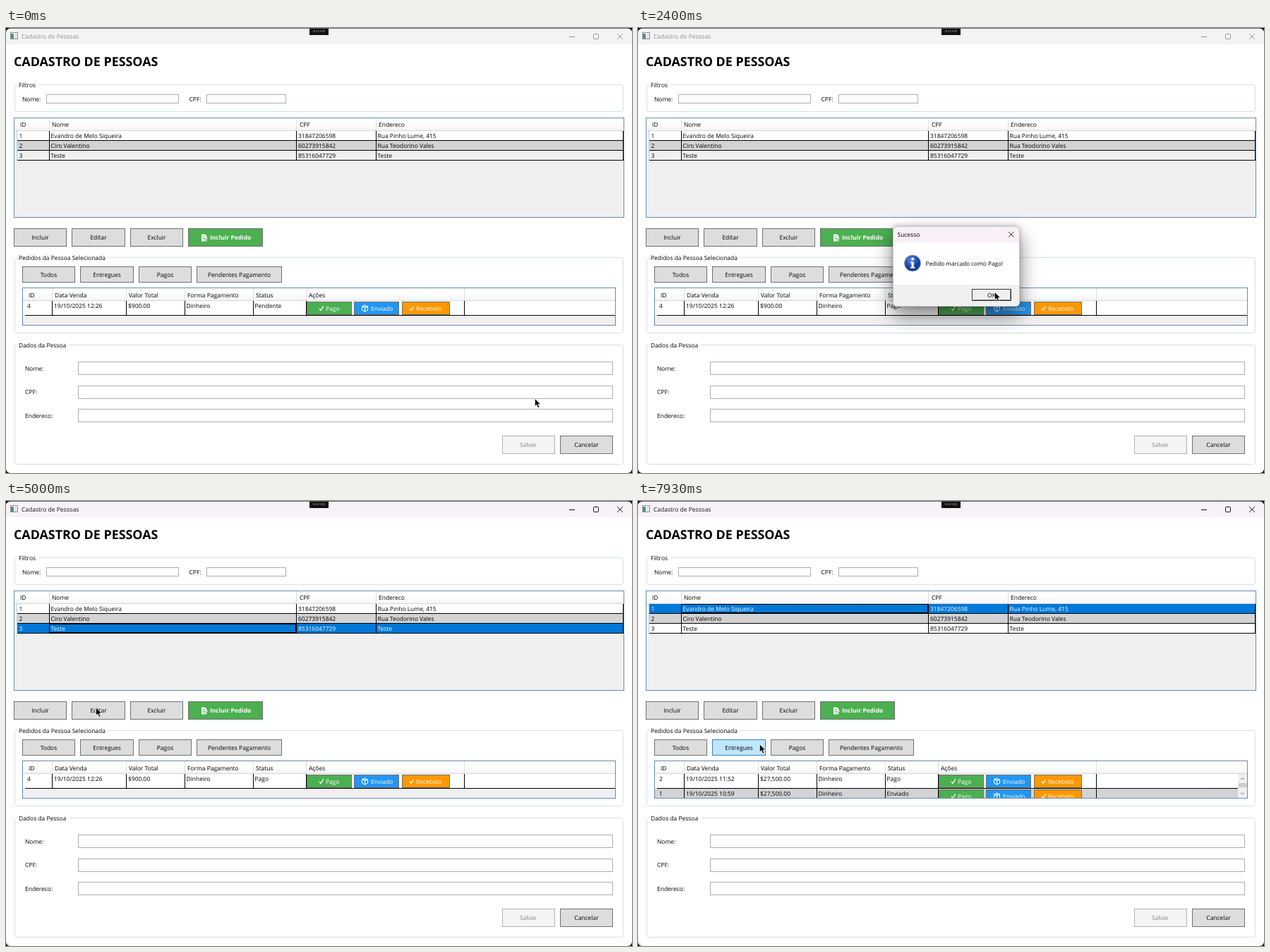
An HTML page for the animation above (8000 ms loop, 887 px wide and 631 px high).

```html
<!DOCTYPE html>
<html lang="pt-BR">
<head>
<meta charset="utf-8">
<title>Cadastro de Pessoas</title>
<style>
html, body { margin: 0; width: 100%; height: 100%; overflow: hidden; background: #000; }
svg { display: block; width: 887px; height: 631px; }
text { font-family: "Open Sans", "Noto Sans", sans-serif; font-size: 8.46px; text-rendering: geometricPrecision; white-space: pre; }
.dialog { filter: drop-shadow(0 13px 14px rgba(0,0,0,.42)) drop-shadow(0 0 3px rgba(0,0,0,.25)); }
</style>
</head>
<body>
<svg id="stage" viewBox="0 0 887 631"></svg>
<script>
const LOOP = 8000, STEP = 1000 / 15;
const BLUE = '#0078d7', GREEN = '#4caf50', GRAY = '#d3d3d3';

const box = (x, y, w, h, fill, extra = '') =>
  `<rect x="${x}" y="${y}" width="${w}" height="${h}" fill="${fill}" ${extra}/>`;
const frame = (x, y, w, h, fill, stroke, extra = '') =>
  box(x + .5, y + .5, w - 1, h - 1, fill, `stroke="${stroke}" ${extra}`);
const label = (x, y, s, fill = '#000', extra = '') =>
  `<text x="${x}" y="${y}" fill="${fill}" ${extra}>${s}</text>`;
const line = (d, stroke, w = 1, extra = '') =>
  `<path d="${d}" fill="none" stroke="${stroke}" stroke-width="${w}" ${extra}/>`;
const hline = (x1, x2, y, c = '#000') => box(x1, y, x2 - x1, 1, c);
const vline = (x, y1, y2, c = '#000') => box(x, y1, 1, y2 - y1, c);
const middle = 'text-anchor="middle"';

function button(x, y, w, h, s, hot) {
  return frame(x, y, w, h, hot ? '#bee6fd' : '#ddd', hot ? '#3c7fb1' : '#707070') +
    label(x + w / 2, y + h / 2 + 3, s, '#000', middle);
}

function group(y, h, s, w) {
  return frame(12, y, 863, h, 'none', '#d5dfe5', 'rx="3"') +
    box(16, y - 4, w + 4, 9, '#fff') + label(18, y + 3.5, s);
}

const input = (x, y, w, h) => frame(x, y, w, h, '#fff', '#abadb3');

function windowBar(active) {
  const ink = active ? '#111' : '#909090';
  return box(0, 0, 887, 23, active ? '#f8f1f8' : '#f3f3f3') +
    frame(6, 6, 11, 10, '#fff', '#8d9296') + box(7, 8, 4, 7, '#4f8f88') + box(12, 8, 4, 7, '#dfe4e6') +
    label(22, 15, 'Cadastro de Pessoas', ink) +
    hline(798, 806, 12, ink) +
    frame(832, 8, 8, 8, 'none', ink, 'rx="1"') +
    line('M866 8l8 8m0-8l-8 8', ink, .9) +
    box(430, 0, 27, 10, '#111') + box(435, 3, 17, 3, '#4c4c4c') +
    [438, 441, 444, 447].map(x => box(x, 3, 1, 3, '#111')).join('');
}

// People table
const people = [
  ['1', 'Evandro de Melo Siqueira', '31847206598', 'Rua Pinho Lume, 415'],
  ['2', 'Ciro Valentino', '60273915842', 'Rua Teodorino Vales'],
  ['3', 'Teste', '85316047729', 'Teste']
];
const peopleCols = [61, 411, 524];

function peopleGrid(selected, idleRow) {
  let s = frame(11, 127, 865, 142, '#f0f0f0', '#688caf') + box(12, 128, 863, 17, 'url(#head)') +
    hline(12, 875, 145, '#d5d5d5') + box(12, 146, 4, 42, '#f1f8fc') + vline(15, 146, 188, '#b9d3e0');
  peopleCols.forEach(x => s += vline(x, 128, 145, '#dcdfe2'));
  ['ID', 'Nome', 'CPF', 'Endereco'].forEach((h, i) => s += label([20, 65, 416, 528][i], 140, h));
  people.forEach((row, i) => {
    const y = 146 + 14.1 * i | 0, on = selected === i;
    s += box(16, y, 859, 13, on ? BLUE : i === 1 ? GRAY : idleRow === i ? '#f0f0f0' : '#fff');
    row.forEach((c, k) => s += label([18.5, 63.5, 414, 526.5][k], y + 10, c, on ? '#fff' : '#000'));
    s += hline(16, 875, y + 13);
    peopleCols.forEach(x => s += vline(x, y, y + 13));
    s += vline(874, y, y + 13);
    if (on) s += frame(61, y, 350, 13, 'none', '#000');
  });
  return s;
}

// Orders table
const orderCols = [65, 170, 253, 350, 425, 649];
const tick = (x, y) => line(`M${x} ${y}l2 2.4l3.8-6`, '#fff', 1.2);
const cube = (x, y) =>
  line(`M${x} ${y - 4.5}l4 2v5l-4 2l-4-2v-5zM${x - 4} ${y - 2.5}l4 2l4-2M${x} ${y - .5}v5M${x - 2} ${y - 3.5}l4 2`, '#fff', 1);

function actions(y, pago) {
  const bt = (x, w, c, tx, s) => frame(x, y, w, 19, c, '#707070') +
    label(tx, y + 12.5, s, '#fff', 'font-weight="500"');
  return bt(426, 64, pago || GREEN, 453, 'Pago') + tick(444, y + 10) +
    bt(493, 64, '#2196f3', 517, 'Enviado') + cube(508.5, y + 9.5) +
    bt(561, 68, '#ff9800', 581, 'Recebido') + tick(572, y + 10);
}

function orderRow(y, cells, fill, right, selected, pago) {
  const ink = selected ? '#fff' : '#000';
  let s = box(24, y, right - 24, 20, fill);
  if (selected) s += box(27, y, 623, 20, BLUE);
  cells.forEach((c, k) => s += label([30, 68, 173, 255.5, 352.5][k], y + 10.4, c, ink));
  s += hline(27, right, y + 20);
  orderCols.forEach(x => s += vline(x, y, y + 20));
  s += actions(y + 1, pago);
  if (selected) s += box(426, y + .8, 223, 19, 'none', 'stroke="#000" stroke-width="1.7"');
  return s;
}

function orderGrid(o) {
  let s = frame(23, 368, 841, 54, '#f0f0f0', '#688caf') + box(24, 369, 839, 17, 'url(#head)') +
    hline(24, 863, 386, '#d5d5d5');
  orderCols.forEach(x => s += vline(x, 369, 386, '#dcdfe2'));
  ['ID', 'Data Venda', 'Valor Total', 'Forma Pagamento', 'Status', 'Ações']
    .forEach((h, i) => s += label([32, 69, 174, 257, 354, 429][i], 381.5, h));
  s += '<g clip-path="url(#rows)">';
  if (o.many) {
    s += orderRow(387, ['2', '19/10/2025 11:52', '$27,500.00', 'Dinheiro', 'Pago'], '#fff', 850) +
      orderRow(408, ['1', '19/10/2025 10:59', '$27,500.00', 'Dinheiro', 'Enviado'], GRAY, 850) +
      box(850, 387, 13, 34, '#f0f0f0') + box(851, 400, 12, 6, '#cdcdcd') +
      line('M854 395l2.5-2.5l2.5 2.5M854 413.500l2.5 2.500l2.5-2.500', '#777');
  } else {
    s += orderRow(387, ['4', '19/10/2025 12:26', '$900.00', 'Dinheiro', o.paid ? 'Pago' : 'Pendente'],
      '#fff', 863, o.selected, o.pago);
  }
  return s + '</g>';
}

function dialog() {
  return '<g class="dialog"><g clip-path="url(#dlg)">' +
    box(361, 281, 180, 114, '#fff') + box(361, 281, 180, 23, '#f9f0f8') + box(361, 364, 180, 31, '#f0f0f0') + '</g></g>' +
    frame(361, 281, 180, 114, 'none', '#aaa5aa', 'rx="6" stroke-opacity=".6"') +
    label(367.5, 296, 'Sucesso') + line('M525 289l7.500 7.500m0-7.500l-7.500 7.500', '#111', .9) +
    '<circle cx="389" cy="333.500" r="11.500" fill="url(#info)" stroke="#9aa3b4"/>' +
    '<circle cx="389.300" cy="327.500" r="1.900" fill="#fff"/>' +
    '<path d="M386 331.500h4.800v7.500h1.700v1.700h-6.700v-1.700h1.700v-5.800h-1.500z" fill="#fff"/>' +
    label(407.5, 337, 'Pedido marcado como Pago!', '#000', 'style="font-size:8.230px" font-weight="500"') +
    frame(473, 370, 56, 17, '#f0f0f0', '#333') + line('M474.500 385V371.500H527', '#fff') +
    line('M475 385.500H527.500V372', '#808080') + label(501, 381.7, 'OK', '#000', middle);
}

// Pointer path: time, x, y
const path = [
  [0, 749, 525], [60, 749, 525], [740, 449, 398], [1010, 449, 398], [1600, 547, 405], [1850, 547, 405],
  [2400, 505, 374], [2670, 497, 371], [3400, 497, 371], [3900, 260, 222], [4400, 150, 182], [4730, 137, 181],
  [4790, 136, 181], [5000, 127, 292.500], [5200, 80, 302], [5470, 62, 347], [5660, 62, 347], [5867, 79, 368.500],
  [5930, 78, 372], [6050, 78, 372], [6333, 256, 287], [6560, 256, 287], [6930, 192, 152], [7330, 177, 152],
  [7430, 177, 152], [7933, 172, 344.500], [8000, 172, 344.500]
];

function pointer(t) {
  const i = Math.max(1, path.findIndex(p => p[0] >= t));
  const [a, b] = [path[i - 1], path[i]];
  const u = (t - a[0]) / (b[0] - a[0]), e = u * u * (3 - 2 * u);
  const x = a[1] + (b[1] - a[1]) * e, y = a[2] + (b[2] - a[2]) * e;
  return `<path transform="translate(${x.toFixed(1)} ${y.toFixed(1)})" ` +
    'd="M.4 .4V11.600L3 9.300L4.900 13.700L6.900 12.800L5 8.600H8.500z" fill="#000" stroke="#fff" stroke-width=".7"/>';
}

const defs = `<defs>
<linearGradient id="head" x2="0" y2="1"><stop offset=".4" stop-color="#fff"/><stop offset="1" stop-color="#f4f5f7"/></linearGradient>
<radialGradient id="info" cx=".4" cy=".3"><stop offset="0" stop-color="#5b8be0"/><stop offset="1" stop-color="#123c9c"/></radialGradient>
<clipPath id="win"><rect y=".7" width="887" height="630.3" rx="6"/></clipPath>
<clipPath id="rows"><rect x="24" y="387" width="839" height="34"/></clipPath>
<clipPath id="dlg"><rect x="361" y="281" width="180" height="114" rx="6"/></clipPath>
</defs>`;

const form = group(80, 39, 'Filtros', 26) + label(23, 104, 'Nome:') + input(57, 94, 188, 13) +
  label(259.5, 104, 'CPF:') + input(284, 94, 113, 13) +
  label(11, 54, 'CADASTRO DE PESSOAS', '#000', 'style="font-size:17.850px" font-weight="700"') +
  group(449, 170, 'Dados da Pessoa', 69) +
  ['Nome:', 'CPF:', 'Endereco:'].map((s, i) =>
    label(27, 485.7 + i * 33.7, s) + input(102, Math.round(473 + i * 33.5), 758, 19)).join('') +
  frame(703, 578, 75, 26, '#f4f4f4', '#adb2b5') + label(740, 594, 'Salvar', '#838383', middle) +
  button(785, 578, 75, 26, 'Cancelar');

const addOrder = frame(258, 284, 106, 26, GREEN, '#707070') +
  '<path d="M277 292.500h5l2.500 2.500v7.500h-7.500z" fill="#fff"/>' +
  line('M278.500 296h3.500M278.500 298.500h4', GREEN, .9) +
  line('M281.500 301.500l4-4', GREEN, 2.6) + line('M281.500 301.500l4-4', '#fff', 1.3) +
  label(289, 300, 'Incluir Pedido', '#fff', 'font-weight="700"');

function draw(t) {
  const at = (a, b) => t >= a && t < b;
  const active = at(790, 925) || t >= 3125;
  const many = t >= 6990;
  return defs + '<g clip-path="url(#win)">' + box(0, 0, 887, 631, '#fff') + windowBar(active) + form +
    peopleGrid(at(4460, 5660) ? 2 : many ? 0 : -1, many ? -1 : 2) +
    button(11, 284, 75, 26, 'Incluir', at(5130, 5270)) + button(93, 284, 76, 26, 'Editar') +
    button(176, 284, 75, 26, 'Excluir') + addOrder +
    group(325, 108, 'Pedidos da Pessoa Selecionada', 124) +
    button(23, 338, 75, 23, 'Todos', at(5390, 5925)) +
    button(105, 338, 76, 23, 'Entregues', t >= 7860) +
    button(188, 338, 75, 23, 'Pagos', at(6190, 6310)) +
    button(270, 338, 121, 23, 'Pendentes Pagamento') +
    orderGrid({
      many, paid: t >= 1125, selected: at(790, 1125),
      pago: at(590, 790) ? '#bee6fd' : at(790, 1125) ? '#c4e5f6' : ''
    }) +
    (at(1125, 3125) ? dialog() : '') + pointer(t) + '</g>';
}

const stage = document.getElementById('stage');
let shown = -1;
function tickFrame(now) {
  // The screen refreshes fifteen times a second
  const step = Math.floor((now % LOOP + 4) / STEP) % 120;
  if (step !== shown) stage.innerHTML = draw((shown = step) * STEP);
  requestAnimationFrame(tickFrame);
}
tickFrame(0);
</script>
</body>
</html>
```
